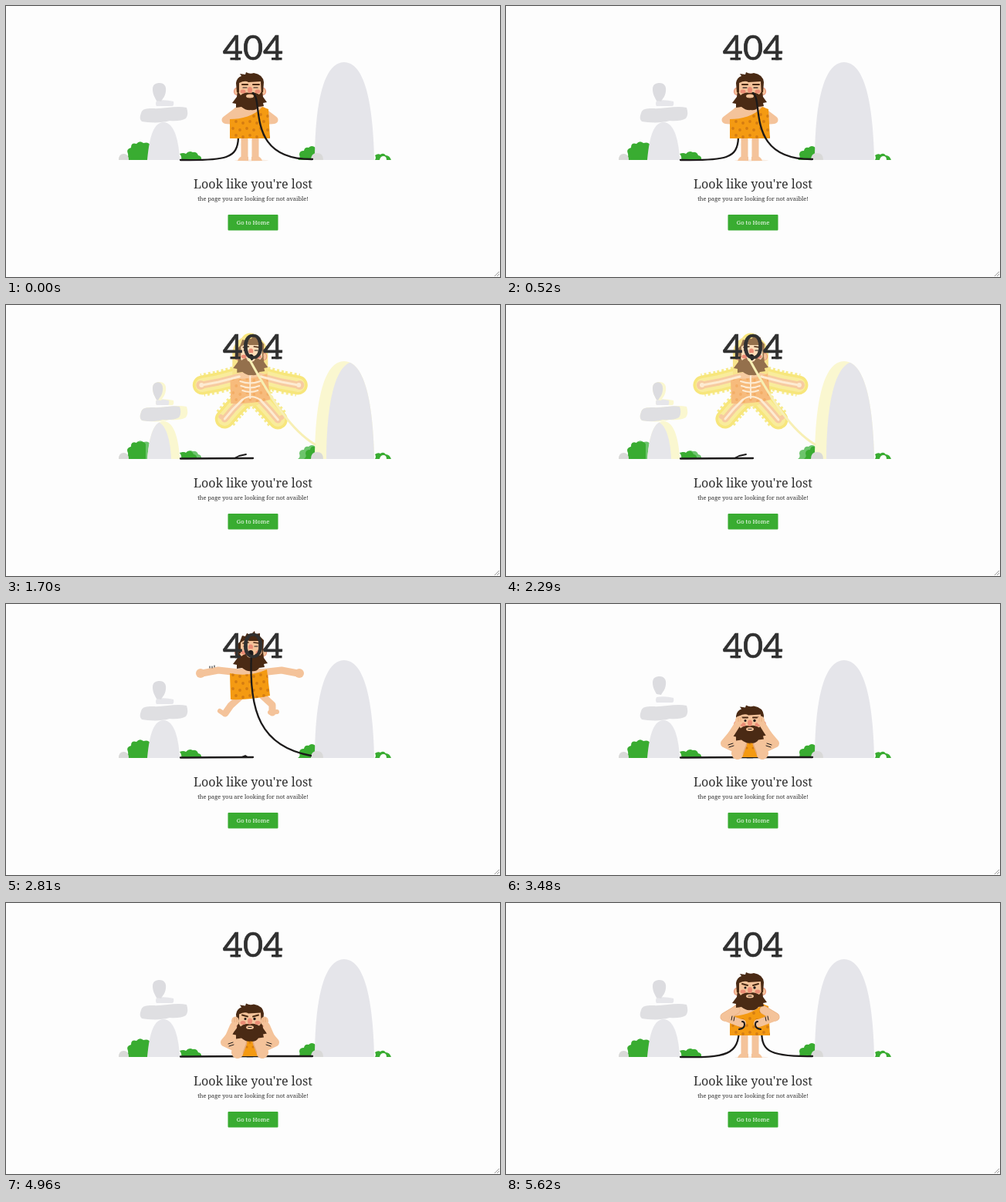
An HTML page with a canvas for the animation above (5.69 s loop, 640 by 352 pixels).

```html
<!DOCTYPE html>
<html lang="en">
<head>
<meta charset="utf-8">
<title>404</title>
<style>
html, body { margin: 0; width: 100%; height: 100%; overflow: hidden; background: #fdfdfd; }
canvas, svg { position: absolute; left: 0; top: 0; width: 640px; height: 352px; }
text { font-family: "Noto Serif", serif; font-weight: 500; fill: #303030; text-anchor: middle; }
.big { font: 45px Lato, sans-serif; stroke: #303030; stroke-width: .7px; }
</style>
</head>
<body>
<canvas id="scene" width="640" height="352"></canvas>
<svg viewBox="0 0 640 352">
  <text class="big" x="320" y="70">404</text>
  <path d="M290.5 68.6h13.5M344 68.6h13.5" stroke="#303030" stroke-width="3.2"/>
  <text x="320" y="236.5" font-size="16.1">Look like you're lost</text>
  <text x="320" y="253" font-size="7.45">the page you are looking for not avaible!</text>
  <rect x="287.5" y="271" width="65" height="20.5" rx="1" fill="#39ac31"/>
  <text x="320" y="284" font-size="7.6" style="fill:#fff">Go to Home</text>
  <path d="M633 351l6-6M636 351l3-3" stroke="#999"/>
</svg>
<script>
const LOOP = 5690;
const SKIN = '#f4c39a', SHADE = '#e5a878', HAIR = '#4a2a14', CLOTH = '#f49a12', SPOT = '#d47c12',
      PINK = '#ea8c74', INK = '#1c1a1a', LEAF = '#39ac31', BONE = '#fdebd2',
      LIT_LEAF = '#6cc46c', LIT_STONE = '#faf7d0';
const g = document.getElementById('scene').getContext('2d');
g.lineCap = g.lineJoin = 'round';

const fill = (color, d) => { g.fillStyle = color; g.fill(new Path2D(d)); };
const line = (color, w, d) => { g.strokeStyle = color; g.lineWidth = w; g.stroke(new Path2D(d)); };
const oval = (color, x, y, rx, ry = rx) => {
  g.fillStyle = color;
  g.beginPath();
  g.ellipse(x, y, rx, ry, 0, 0, 7);
  g.fill();
};
const at = (x, y, draw) => { g.save(); g.translate(x, y); draw(); g.restore(); };
const mirror = draw => {
  draw();
  g.save(); g.translate(632, 0); g.scale(-1, 1); draw(); g.restore();
};
const ramp = (t, a, b) => Math.min(1, Math.max(0, (t - a) / (b - a)));
const ease = p => p * p * (3 - 2 * p);
const mix = (a, b, p) => a.map((v, i) => v + (b[i] - v) * p);
const cable = (p, color = INK) =>
  line(color, color === INK ? 2.3 : 3, `M${p[0]} ${p[1]}C${p.slice(2)}`);

// Cable curves as cubic control points
const LEFT = {
  stand: [226, 200, 285, 201, 300, 198, 301, 171],
  floor: [226, 199.5, 260, 199, 290, 199, 320, 199],
  hold: [226, 200, 285, 201, 302, 198, 302, 162]
};
const RIGHT = {
  bite: [397, 199, 310, 200, 334, 122, 320, 113],
  air: [395, 197, 330, 185, 314, 140, 318, 60],
  shock: [400, 181, 370, 163, 345, 125, 315, 70],
  floor: [397, 199, 370, 199, 340, 199, 312, 199],
  hold: [397, 199, 335, 200, 331, 190, 331, 162]
};

// A flat shape whose edge facing the middle lights up by `glow` pixels
function lit(color, light, d, glow) {
  if (!glow) return fill(color, d);
  fill(light, d);
  g.save();
  g.clip(new Path2D(d));
  g.translate(glow, 0);
  fill(color, d);
  g.restore();
}

function scenery(t, flash) {
  const p = ramp(t, 3300, 3660), hop = 4 * p * (1 - p);
  const bush = (d, glow) => lit(LEAF, LIT_LEAF, d, flash * glow);
  const stone = (color, d, glow) => lit(color, LIT_STONE, d, flash * glow);
  const pebble = (x, w, h) => fill('#d9d9d8', `M${x} 200q0 ${-h} ${w * .5} ${-h}q${w * .5} 0 ${w * .5} ${h}z`);

  bush('M156 200Q159 196 158 192Q155 186 162 184Q162 177 169 179Q173 174 178 178Q185 176 187 181V200Z', -6);
  bush('M227 200Q228 195 225 192Q230 190 233 192Q237 187 242 190Q247 189 249 194Q254 195 253 200Z', -6);
  bush('M378 200Q382 198 380 193Q380 188 386 188Q387 183 392 184Q396 180 401 184V200Z', 8);
  bush('M478 200Q480 197 478 194Q482 191 485 193Q489 190 492 194Q497 194 499 200Z', 0);
  pebble(146, 13, 8);
  stone('#e6e6ea', 'M183 200C185 178 189 151 204 151C219 151 224 178 225 200Z', -11);
  stone('#dfdfe2', 'M175 139Q176 132 190 133C205 134 220 129 234 132Q237 141 233 146Q226 150 212 149C198 153 184 151 176 150Q172 147 175 139Z', -9);
  at(0, -2 * hop, () => stone('#e6e6ea', 'M195 123Q206 121 217 124Q218 130 215 130L195 130Q193 127 195 123Z', -6));
  at(0, -6 * hop, () => stone('#dcdce0', 'M190 108C190 102 194 100 199 100C205 100 208 104 207 111C206 118 203 120 201 124L195 123C193 119 190 115 190 108Z', -4));
  stone('#e5e5ea', 'M400 200C400 150 406 73 438 73C470 73 476 150 477 200Z', 15);
  pebble(395, 16, 9);
  fill('#fdfdfd', 'M484 200q1 -5 5 -5q4 0 4 5z');
}

function head(x, y, look, shocked) {
  const hair = shocked ? '#94704c' : HAIR, skin = shocked ? '#fbdcb8' : SKIN;
  at(x, y, () => {
    oval(PINK, -17, 3, 4, 5);
    oval(PINK, 17, 3, 4, 5);
    oval(SKIN, -17, 3, 3, 4);
    oval(SKIN, 17, 3, 3, 4);
    fill(hair, look === 'air'
      ? 'M-16 4L-18 -7L-14 -11L-11 -19L-7 -18L-5 -22L0 -20L5 -25L6 -21L12 -22L12 -18L17 -13L16 4Z'
      : 'M-17 4L-18 -8Q-17 -15 -11 -17L-13 -20L-6 -19L-5 -22Q0 -19 5 -21Q17 -19 18 -9L17 4Z');
    fill(skin, look === 'air'
      ? 'M-13 -10Q-6 -15 -2 -12L14 -12L15 10L-13 10Z'
      : 'M-14 -8Q-6 -12 -2 -9L14 -10L15 10L-14 10Z');
    fill(hair, 'M-16 2L-17 10L-23 18L-18 19L-18 24L-11 23Q-5 28 1 27Q8 28 11 23L18 22L17 18L22 17L17 10L16 2L12 7Q6 3 0 5Q-7 3 -12 8Z');
    oval(PINK, -9, 3, 3.5, 2.5);
    oval(PINK, 10, 3, 3.5, 2.5);
    if (look === 'air') {
      oval(PINK, 0, -4, 3, 3.5);
      line(HAIR, 1.6, 'M-10 -9l7 -1M4 -10l7 1');
      line(INK, 1.2, 'M-9 -5h4M5 -5h4');
      oval(skin, 0, 4, 6, 6);
      oval(INK, 0, 4, 3.5, 4);
      return;
    }
    oval(PINK, 0, 1, 3, 4);
    oval(SKIN, 0, 9, 5, 2.5);
    line(HAIR, 2, look === 'frown' ? 'M-10 -7l7 2M4 -5l7 -2' : 'M-10 -6h7M4 -6h8');
    if (look === 'shut') line(INK, 1.2, 'M-9 -2h5M5 -2h5');
    else {
      if (look === 'wink') line(INK, 1.2, 'M-9 -2h5');
      else oval(INK, -6, -2, 1.5);
      oval(INK, 6, -2, 1.7);
    }
    if (look !== 'shut' && look !== 'wink') line(INK, 1.2, 'M-2 9h4');
  });
}

const TUNIC = 'M290 147C305 147 322 143 332 131L340 134L342 172L290 172Z';
const RAISED_TUNIC = 'M290 139Q316 144 338 134L342 168Q316 174 291 173Z';

function tunic(shape, color = CLOTH, spot = SPOT) {
  g.save();
  fill(color, shape);
  g.clip(new Path2D(shape));
  for (let i = 0; i < 24; i++)
    oval(spot, 294 + i % 6 * 9 + (i / 6 & 1) * 4, 141 + (i / 6 | 0) * 9 + i % 2 * 2, 1.9);
  g.restore();
}

function standing(t, holding) {
  const bob = holding ? 4 : Math.sin(t / 170) * .5;
  oval('#f8ece2', 318, 200.5, 22, 1.2);
  mirror(() => {
    line(SKIN, 9, 'M309 170V196');
    fill(SKIN, 'M300 201Q302 195 308 195L314 196V201Z');
  });
  if (!holding) mirror(() => line(SKIN, 10, 'M299 137L284.5 148L296 149'));
  fill(SKIN, 'M292 138Q296 131 304 129L330 129Q338 132 340 140V160H292Z');
  tunic(TUNIC);
  if (holding) mirror(() => {
    line(SHADE, 11, 'M298 139L283 148');
    line(SKIN, 10, 'M298 139L283 148L304 156');
    line(INK, 1, 'M293 147l-1 5M296 148l-1 5');
    oval(SKIN, 306, 156, 5);
    line(INK, 2, 'M302 164Q309 163 309 158Q309 154 306 154');
  });
  head(316, 108 + bob, holding ? 'frown' : t > 600 && t < 1200 ? 'wink' : 'shut');
}

function airborne(shocked) {
  const hand = shocked ? 149 : 139;
  const arms = `M302 138L275 ${hand - 4}L254 ${hand}M330 138L357 ${hand - 4}L378 ${hand}`;
  const legs = shocked
    ? 'M306 168L294 180L283 193M329 168L341 181L352 194'
    : 'M304 169L291 181L284 191M332 168L345 180L345 190';
  if (shocked) {
    const halo = arms + legs + 'M316 94V160M304 140V160M330 140V160';
    g.lineCap = 'butt';
    g.setLineDash([3, 3]);
    line('#f7eb8c', 30, halo);
    g.setLineDash([]);
    g.lineCap = 'round';
    line('#f7e67c', 25, halo);
    line('#f9ec9c', 18, halo);
    line('#f8e48c', 46, 'M316 108V154');
  }
  const skin = shocked ? '#f7cba0' : SKIN;
  line(skin, 9, arms + legs);
  oval(skin, 252, hand, 6);
  oval(skin, 380, hand, 6);
  line(skin, 6, shocked ? 'M283 193l-5 -3M352 194l5 -3' : 'M283 192l-6 -4M342 190l9 -1');
  fill(skin, 'M292 138Q316 124 340 138V160H292Z');
  if (shocked) {
    tunic(RAISED_TUNIC, '#f7bb7c', '#f3ad66');
    line(BONE, 3, arms + legs);
    line(BONE, 2, 'M316 132V166M303 144q13 5 26 0M304 150q12 5 24 0M306 156q10 4 20 0M306 168q10 -8 23 0');
    oval(BONE, 253, hand, 3);
    oval(BONE, 379, hand, 3);
  } else {
    tunic(RAISED_TUNIC);
    line(INK, 1, 'M264 132v-2M267 132v-2M270 131v-2');
  }
  head(317, 109, 'air', shocked);
}

function seated(t) {
  const peek = t < 3900, bob = (peek ? 1 : 0) + Math.sin((t - 4590) / 230) * .5;
  fill(SKIN, 'M288 180Q292 158 304 157H328Q340 158 344 180L338 194H294Z');
  fill(CLOTH, 'M298 178L334 178L326 199H306Z');
  for (let i = 0; i < 5; i++) oval(SPOT, 308 + i * 4, 181 + i % 2 * 6, 1.5);
  mirror(() => {
    line(SHADE, 15, 'M305 181L300 194');
    line(SKIN, 14, 'M304 181L299 194');
    line(SKIN, 11, 'M297 165L283.5 181L294 186');
    oval(SKIN, 300, 196, 7, 6);
    line(INK, 1, 'M288 183l6 -2M289 186l6 -2');
  });
  head(316, 152 + bob, peek ? 'open' : 'frown');
  mirror(() => {
    const x = peek ? 304 : 299, y = (peek ? 150 : 153) + bob;
    line(SKIN, 8, `M286 178L${x - 5} ${y + 6}`);
    oval(SKIN, x - 2, y, 5, 6);
    line(SHADE, .8, `M${x - 3} ${y - 4}v5M${x} ${y - 4}v5`);
  });
}

function frame(now) {
  const t = now % LOOP;
  const flick = t >= 1340 && t < 2690 && Math.floor((t - 1340) / 150) % 2 === 0;
  const shake = t > 1300 && t < 2690 ? Math.sin(t / 15) : 0;
  const fall = ramp(t, 3030, 3300) ** 2;
  const rise = ease(ramp(t, 5000, 5250));
  const launch = ease(ramp(t, 1260, 1360));
  const lift = (flick ? -45 : -49) * launch - 9 * ease(ramp(t, 2810, 2980)) + 102 * fall;

  g.clearRect(0, 0, 640, 352);
  scenery(t, flick ? 1 : 0);

  let left = mix(LEFT.stand, LEFT.floor, ramp(t, 1260, 1400));
  let right = mix(RIGHT.bite, RIGHT.air, launch);
  if (t > 1360 && t < 3030) right[7] = 113 + lift;
  if (flick) right = RIGHT.shock;
  if (t >= 3030) right = mix(RIGHT.air, RIGHT.floor, fall);
  if (t >= 5000) {
    left = mix(LEFT.floor, LEFT.hold, rise);
    right = mix(RIGHT.floor, RIGHT.hold, rise);
  }
  cable(left);
  if (t > 1400 && t < 3300)
    line(INK, 1.8, flick ? 'M296 199l6 -3l9 -2' : 'M305 199l5 -2l3 2');

  const sitting = t >= 3300 && t < 5000;
  if (sitting || t >= 5000) cable(right);
  if (t < 1260) standing(t, false);
  else if (t < 3300) at(shake, lift, () => airborne(flick));
  else if (sitting) seated(t);
  else at(0, 24 * (1 - rise), () => {
    g.beginPath();
    g.rect(0, 0, 640, 201 - 24 * (1 - rise));
    g.clip();
    standing(t, true);
  });
  if (t < 3300) cable(right, flick ? '#f7efb4' : INK);
}

const start = performance.now();
(function tick() {
  frame(performance.now() - start);
  requestAnimationFrame(tick);
})();
</script>
</body>
</html>
```
